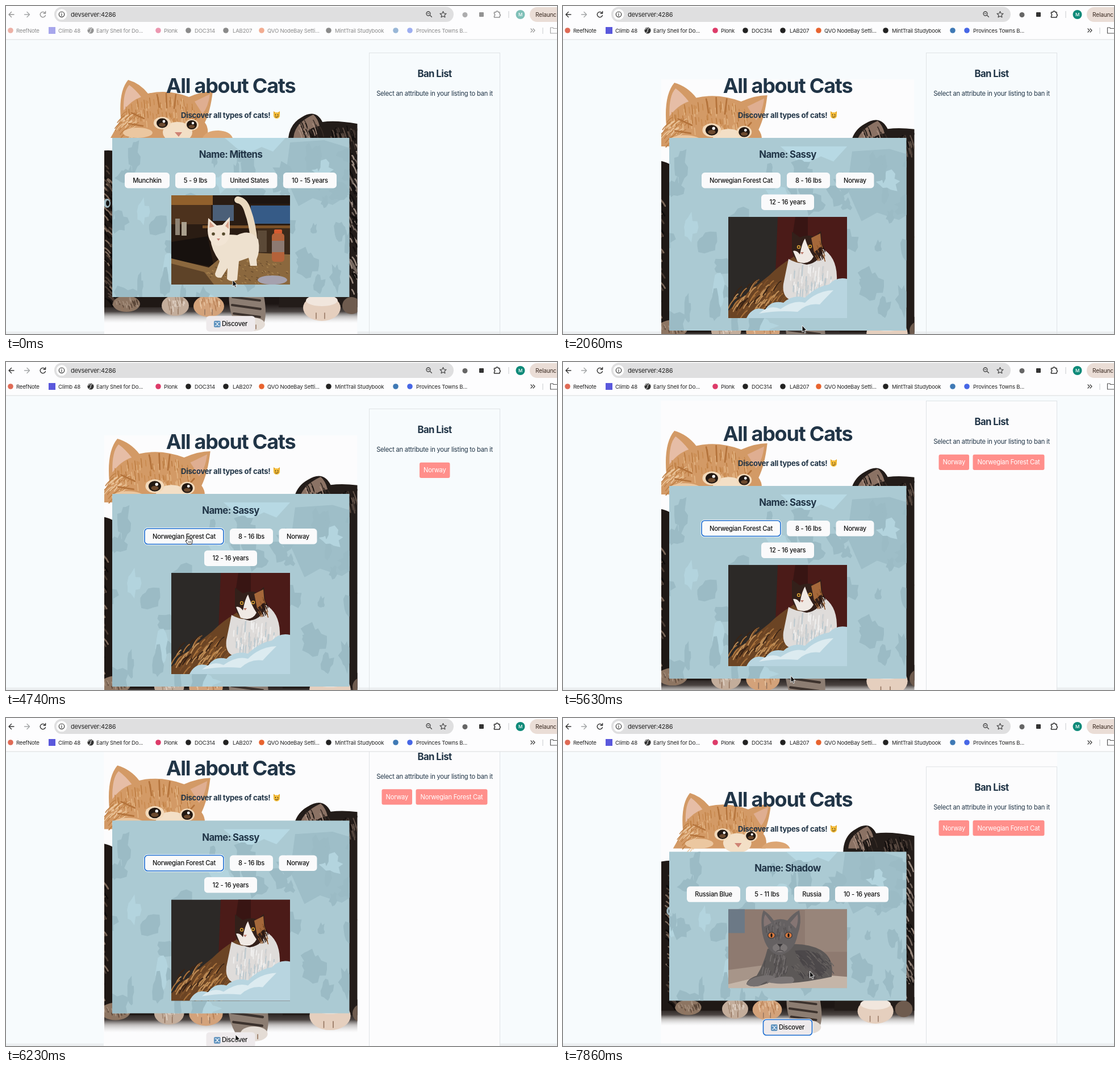
Animation of 970x577 px, one loop 8000 ms. Source, as an HTML page:

```html
<!DOCTYPE html>
<html lang="en">
<head>
<meta charset="utf-8">
<title>All about Cats</title>
<style>
  html, body { margin: 0; width: 100%; height: 100%; overflow: hidden; background: #f7fbfd; }
  svg { display: block; width: 970px; height: 577px; }
  text { font-family: Inter, Roboto, sans-serif; font-optical-sizing: none; letter-spacing: -.022em; white-space: pre; }
  .h1 { letter-spacing: -.035em; }
  .h2 { letter-spacing: -.036em; }
</style>
</head>
<body>
<svg id="stage" viewBox="0 0 970 577"></svg>
<script>
const LOOP = 8000, STEP = 148.15, INK = '#213547';
const stage = document.getElementById('stage');

// Drawing helpers; text is placed by its vertical middle.
const rect = (x, y, w, h, fill, r = 0, more = '') =>
  `<rect x="${x}" y="${y}" width="${w}" height="${h}" rx="${r}" fill="${fill}" ${more}/>`;
const oval = (x, y, rx, ry, fill) => `<ellipse cx="${x}" cy="${y}" rx="${rx}" ry="${ry}" fill="${fill}"/>`;
const dot = (x, y, r, fill) => oval(x, y, r, r, fill);
const shape = (d, fill) => `<path d="${d}" fill="${fill}"/>`;
const line = (d, color, w = 1.4) =>
  `<path d="${d}" fill="none" stroke="${color}" stroke-width="${w}" stroke-linecap="round" stroke-linejoin="round"/>`;
const text = (x, y, str, size, weight = 400, fill = INK, anchor = 'start', cls = '') =>
  `<text x="${x}" y="${y + size * .36}" font-size="${size}" font-weight="${weight}" fill="${fill}" text-anchor="${anchor}" class="${cls}">${str}</text>`;
const move = (x, y, body) => `<g transform="translate(${x} ${y})">${body}</g>`;
const clip = (id, body) => `<g clip-path="url(#${id})">${body}</g>`;

// Piecewise linear value of rows [time, ...values].
function track(rows, t) {
  const i = rows.findIndex(row => row[0] > t);
  if (i < 0) return rows[rows.length - 1].slice(1);
  const a = rows[Math.max(i - 1, 0)], b = rows[i];
  const p = i ? (t - a[0]) / (b[0] - a[0]) : 0;
  return a.slice(1).map((v, k) => v + (b[k + 1] - v) * p);
}

const within = (t, a, b) => t >= a && t < b;

function seeded(seed) {
  return () => (seed = seed * 16807 % 2147483647) / 2147483647;
}

// Short strokes of hair scattered over an oval, lying along (dx, dy).
function fur(seed, count, [cx, cy, rx, ry], [dx, dy], colors, width = 1.5) {
  const rnd = seeded(seed);
  let out = '';
  for (let i = 0; i < count; i++) {
    const a = rnd() * 6.283, r = Math.sqrt(rnd()), k = .5 + rnd();
    const x = cx + Math.cos(a) * r * rx, y = cy + Math.sin(a) * r * ry;
    out += line(`M${x.toFixed(1)},${y.toFixed(1)}q${dx * k * .6},${dy * k * .3} ${dx * k},${dy * k}`, colors[i % colors.length], width);
  }
  return out;
}

// Ragged coat markings seen through the panel.
function markings() {
  const rnd = seeded(77);
  let out = '';
  for (let i = 0; i < 60; i++) {
    const x = 170 + rnd() * 450, y = 262 + rnd() * 260, rx = 6 + rnd() * 20, ry = 10 + rnd() * 26;
    const points = Array.from({ length: 14 }, (_, k) => {
      const r = .45 + rnd() * .6, a = k / 14 * 6.283;
      return (x + Math.cos(a) * rx * r).toFixed(1) + ',' + (y + Math.sin(a) * ry * r).toFixed(1);
    });
    out += `<polygon points="${points.join(' ')}" fill="${i % 6 ? '#9bbbc5' : '#b3d4de'}"/>`;
  }
  return shape('M385,232H492L470,256L450,248L420,262Z', '#b7d9e4') +
    shape('M500,240L560,236L606,250V330L575,350L540,338L515,352L492,300Z', '#9ebec8') + out;
}

const kittens = [
  rect(140, 505, 510, 55, 'url(#floor)'),
  shape('M140,262Q185,246 210,262L330,280V530H140Z', '#1f1815'),
  shape('M497,232Q500,207 520,196Q545,180 557,204Q590,199 650,214V530H480Z', '#231c19'),
  shape('M506,232Q508,206 541,191Q549,198 552,211Q530,214 526,232Z', '#8b7264'),
  fur(5, 26, [535, 213, 22, 14], [5, 13], ['#3a2e28', '#a98f80', '#17120f']),
  fur(6, 50, [595, 224, 28, 16], [3, 10], ['#41352f', '#110d0c', '#5c4c43'], 2),
  fur(7, 80, [180, 395, 12, 130], [8, 9], ['#7d695b', '#0f0b0a', '#4b3c33'], 2.5),
  fur(8, 80, [612, 380, 12, 145], [6, 12], ['#75675f', '#120e0d', '#9b8b80'], 2.5),
  oval(178, 347, 6, 8, '#9fb7bf'), oval(179, 347, 3, 5, '#111'),
  shape('M184,232L193,216L202,198Q198,150 215,130Q236,136 250,154Q285,146 322,160Q345,150 364,150Q360,185 350,205Q358,215 354,232Z', '#d39a66'),
  shape('M346,232Q352,219 374,219Q394,220 399,232Z', '#dca674'),
  shape('M207,184Q206,150 217,139Q228,147 238,160Q220,166 207,184Z', '#e6bda6'),
  shape('M332,168L359,155Q356,178 346,190Z', '#dfae91'),
  fur(9, 90, [272, 182, 62, 24], [1, 10], ['#bd7d42', '#e3b584', '#c98a4f']),
  fur(10, 45, [222, 205, 20, 24], [-9, 8], ['#c08248', '#ecc79d']),
  line('M266,156l4,22M282,154l1,25M299,156l-3,24M221,188l22,10M216,207l25,4M338,194l-8,9', '#b4733b', 2.5),
  oval(302, 222, 26, 18, '#f3dfc6'), oval(232, 223, 26, 9, '#ebc7a0'),
  oval(275, 206, 15, 11, '#f3dabb'), oval(327, 209, 12, 10, '#f3dabb'),
  oval(275, 206, 10, 8.5, '#221812'), oval(327, 209, 9, 8, '#221812'),
  oval(275, 209, 6, 3.5, '#6d4a2e'), oval(327, 212, 5.5, 3, '#6d4a2e'),
  dot(278, 203, 2.4, '#fff'), dot(329, 206, 2.2, '#fff'),
  shape('M297,222h13l-6,8z', '#cf8374'),
  // paws
  oval(212, 524, 24, 14, '#8d7562'), oval(298, 527, 24, 18, '#c3ad9b'),
  oval(357, 528, 27, 19, '#d3a27a'),
  shape('M393,500H452Q462,545 452,563Q425,582 405,560Q390,535 393,500Z', '#8c7d72'),
  oval(434, 560, 22, 12, '#e4dcd5'),
  oval(556, 531, 33, 23, '#e5cfbe'), oval(556, 518, 28, 10, '#f1e6dd'), oval(608, 527, 16, 15, '#6e5b4e'),
  fur(11, 24, [212, 520, 20, 8], [2, 6], ['#5a4638', '#a89280']),
  fur(12, 24, [300, 520, 18, 9], [1, 7], ['#e2d4c8', '#a28873']),
  fur(13, 24, [357, 520, 20, 9], [1, 7], ['#e8c6a4', '#b98257']),
  line('M291,533v9M303,533v9M350,534v9M363,534v9M428,562v7M440,561v7M546,540v10M561,540v10M205,529v7M219,529v7', '#94745f', 1.5),
  line('M399,512l48,6M398,526l50,7M401,541l46,6', '#3c322d', 4)
].join('');
const coat = markings();

const whiteCat = [
  rect(0, 0, 209, 157, '#2a1c13'), rect(0, 0, 73, 17, '#91602c'),
  rect(0, 17, 70, 34, '#4d321d'), rect(73, 17, 37, 28, '#4b5f78'),
  rect(140, 18, 69, 32, '#365b87'), rect(110, 0, 99, 15, '#1e1510'),
  rect(55, 53, 154, 5, '#7a5027'), rect(150, 58, 59, 45, '#3c2a1b'),
  rect(7, 41, 8, 29, '#8e8375'), rect(18, 47, 9, 24, '#aaa08e'), rect(152, 62, 16, 38, '#5b4937'),
  shape('M0,82L64,72L75,126L0,113Z', '#17110e'),
  shape('M0,111L66,127L100,99L209,104V157H0Z', '#8b683e'),
  shape('M0,120L58,135L75,157H0Z', '#5e4328'),
  fur(14, 90, [135, 134, 74, 22], [2, 1], ['#a8834f', '#6d5030']),
  oval(178, 149, 26, 8, '#a5a1ae'),
  line('M146,84Q143,50 135,29Q130,10 117,8', '#ead9c0', 12),
  shape('M69,77Q90,67 116,70Q140,58 153,78Q157,98 150,113L151,124H139L136,110L119,116L116,149Q105,154 98,147L99,128L88,145Q77,146 77,138L85,116Q70,95 69,77Z', '#eee1cf'),
  shape('M64,62L65,40L80,53L90,52L103,38L103,65Q101,87 84,89Q65,87 64,62Z', '#f2e5d5'),
  shape('M67,57l1,-11l8,9zM95,54l6,-9v14z', '#d9a28a'),
  dot(74, 68, 2.8, '#554a2c'), dot(92, 68, 2.8, '#554a2c'), shape('M80,76h6l-3,4z', '#c9877a'),
  rect(181, 60, 14, 8, '#d65a2f', 2), rect(177, 67, 22, 50, '#b4623a', 5), rect(177, 80, 22, 20, '#8d7a72')
].join('');

const longHairCat = [
  rect(0, 0, 209, 178, '#2c2927'), shape('M87,0H209V178H80Z', '#4b1b18'),
  shape('M118,0h22v40h-28z', '#381513'),
  shape('M0,178V165Q40,128 72,103Q90,85 112,72Q150,45 174,62Q196,90 190,135L120,178Z', '#6b4424'),
  fur(15, 130, [68, 142, 58, 34], [-10, 13], ['#3a2416', '#a8713b', '#7c4f29', '#c08e57'], 2),
  shape('M106,74Q143,95 166,56Q190,70 191,104Q194,142 145,147Q92,157 97,118Z', '#dfdcda'),
  fur(16, 90, [146, 110, 38, 28], [-1, 13], ['#f0efee', '#bcc9cf', '#d5d3d2'], 2),
  shape('M112,58L112,26L126,36Q140,30 151,35L163,25L166,56Q163,80 138,84Q115,80 112,58Z', '#33201a'),
  shape('M146,37L162,29L164,52L151,62Z', '#a5683a'),
  shape('M114,60Q120,58 126,66Q130,45 135,38Q141,57 150,70Q142,86 122,79Z', '#f0e9e4'),
  fur(17, 22, [160, 58, 9, 16], [4, 8], ['#8e572c', '#2a1812']),
  dot(124, 53, 3.2, '#d49a35'), dot(144, 52, 3.2, '#d49a35'), dot(124, 53, 1.5, '#111'), dot(144, 52, 1.5, '#111'),
  shape('M127,62h6l-3,4z', '#b97869'),
  shape('M32,178Q43,156 65,163Q76,146 97,151Q113,136 135,142Q155,122 177,119Q190,105 209,109V178Z', '#b8d5e0'),
  shape('M54,170q19,-17 38,-8q24,-17 43,-11q21,-21 50,-22q-18,18 -24,25q-22,-3 -39,13q-35,-3 -68,3z', '#dcebf0')
].join('');

const greyCat = [
  rect(0, 0, 209, 139, '#8e7a70'), rect(0, 0, 29, 42, '#6c7986'), rect(135, 0, 74, 75, '#98857a'),
  shape('M0,116Q50,105 209,119V139H0Z', '#c4b5a8'), shape('M0,107L60,99L55,119L0,132Z', '#a79589'),
  shape('M69,70Q126,52 163,72Q187,86 182,119Q140,128 110,130L72,129Q43,141 32,132Q33,123 50,117Q62,98 69,70Z', '#5c5857'),
  shape('M117,73Q155,68 172,96Q177,112 160,118Q133,112 117,73Z', '#4c484a'),
  fur(18, 80, [145, 96, 34, 24], [6, 6], ['#686361', '#484446', '#5b5656']),
  fur(19, 60, [84, 100, 22, 24], [-2, 9], ['#757070', '#504c4d']),
  shape('M32,132Q36,121 56,118Q78,112 84,123Q62,127 55,135Q40,138 32,132Z', '#757070'),
  shape('M68,128Q82,116 112,119Q120,125 112,130Q85,133 68,128Z', '#7a7575'),
  shape('M60,43Q56,15 62,2Q73,9 80,20Q92,15 104,20Q114,7 125,2Q130,24 122,45Q116,77 89,81Q67,76 60,43Z', '#656162'),
  shape('M63,31Q61,17 65,9L76,24ZM109,24L122,9Q124,22 119,34Z', '#857573'),
  fur(20, 45, [91, 34, 24, 13], [0, 6], ['#736e6e', '#555152']),
  oval(76, 46, 7, 6, '#454143'), oval(106, 46, 7, 6, '#454143'),
  oval(76, 46, 5.5, 4.5, '#d9793d'), oval(106, 46, 5.5, 4.5, '#d9793d'),
  oval(76, 46, 1.6, 3.5, '#171717'), oval(106, 46, 1.6, 3.5, '#171717'),
  oval(91, 68, 13, 8, '#7b7676'),
  shape('M86,61h10l-5,6z', '#393638'), line('M91,67v4M85,74q6,-4 12,0', '#393638', 1)
].join('');

// Chips are [label, x, width, row].
const MITTENS = {
  name: 'Mittens', art: whiteCat, top: 333, tall: 157, dy: 0, back: '',
  chips: [['Munchkin', 209, 79, 0], ['5 - 9 lbs', 298, 71, 0], ['United States', 379.5, 98, 0], ['10 - 15 years', 488, 94, 0]]
};
const SASSY = {
  name: 'Sassy', art: longHairCat, top: 371, tall: 178, dy: 0, back: 'matrix(1.098 0 0 1.098 -40 -7.7)',
  chips: [['Norwegian Forest Cat', 244, 139, 0], ['8 - 16 lbs', 394, 76, 0], ['Norway', 480.5, 67, 0], ['12 - 16 years', 349, 93, 1]]
};
const SHADOW = {
  name: 'Shadow', art: greyCat, top: 333, tall: 139, dy: 3.3, back: 'matrix(.958 0 0 .957 17.5 4.3)',
  chips: [['Russian Blue', 218, 94, 0], ['5 - 11 lbs', 322, 74, 0], ['Russia', 407, 62, 0], ['10 - 16 years', 479, 94, 0]]
};
const bottomOf = cat => cat.top + cat.tall + 22;

function button(x, y, w, label, focused, hovered, fill = '#fafafb', shift = 0) {
  const h = 27.5;
  const halo = focused ? rect(x - .3, y - .3, w + .6, h + .6, fill, 6, 'stroke="#fff" stroke-width="3"') : '';
  const edge = focused ? 'stroke="#1a6cd0" stroke-width="1.6"' : hovered ? 'stroke="#a9a8e8"' : '';
  return halo + rect(x, y, w, h, fill, 5.6, edge) +
    text(x + w / 2 + shift, y + h / 2, label, 11.2, 500, '#111', 'middle');
}

function listing(cat, focus, hover) {
  const bottom = bottomOf(cat), y = bottom + 33.2;
  const placed = body => `<g transform="${cat.back}">${body}</g>`;
  const emoji = shape('M471,192L471,185L475,188H478L482,185V192Z', '#e7a928') + dot(476.5, 192.5, 5.6, '#f4bd3a') +
    dot(474.5, 191.5, .9, '#443016') + dot(478.6, 191.5, .9, '#443016') + line('M474,195q3,2 5.5,-1', '#443016', 1);
  const shuffle = rect(366, y + 8.5, 11.5, 11.5, '#5d91bd', 2) +
    line(`M368,${y + 11.5}h2l4,5.5h2M368,${y + 17}h2l4,-5.5h2`, '#fff', 1.1);
  return clip('photo', placed(kittens)) +
    text(395.5, 140, 'All about Cats', 36, 700, INK, 'middle', 'h1') +
    text(308, 192, 'Discover all types of cats!', 13.1, 700) + emoji +
    rect(187, 232, 417.5, bottom - 232, '#abcad3') + clip('panel' + cat.name, placed(coat)) +
    text(395.5, 261, 'Name: ' + cat.name, 16.8, 700, INK, 'middle', 'h2') +
    cat.chips.map(([label, x, w, row]) =>
      button(x, 293 + row * 38.5, w, label, focus === label, hover === label)).join('') +
    move(291, cat.top, clip('art' + cat.name, cat.art)) +
    button(352.5, y, 86, 'Discover', focus === 'Discover', false, '#eeeaec', 7) + shuffle;
}

function banList(bans) {
  const spots = bans.length > 1 ? [[661.5, 53.5], [721.5, 126]] : [[728, 53.5]];
  return rect(639.5, 82.5, 230, 560, 'none', 0, 'stroke="#dfe3e6"') +
    text(754.5, 119, 'Ban List', 16.8, 700, INK, 'middle', 'h2') +
    text(754.5, 154, 'Select an attribute in your listing to ban it', 11.2, 400, INK, 'middle') +
    bans.map((label, i) => rect(spots[i][0], 176.7, spots[i][1], 27.3, '#ff8f8b', 3) +
      text(spots[i][0] + spots[i][1] / 2, 190.3, label, 11.2, 400, '#fff', 'middle')).join('');
}

// Bookmarks are [icon x, colour, text x, label].
const bookmarks = [
  [8, '#df6a55', 18, 'ReefNote'], [81, '#5a58dc', 92, 'Climb 48'], [149, '#333', 159, 'Early Shell for Do...'],
  [268, '#dd3b69', 278, 'Plonk'], [321, '#222', 332, 'DOC314'], [387, '#222', 399, 'LAB207'],
  [450, '#e8632f', 460, 'QVO NodeBay Setti...'], [568, '#222', 579, 'MintTrail Studybook'],
  [686, '#3f79b5', 0, ''], [711, '#4767e6', 722, 'Provinces Towns B...']
];

function toolbar(active) {
  const dark = '#333';
  const icons =
    line('M14,15H5.5M9.5,10.5L5,15L9.5,19.5', dark) +
    line('M68.5,12A4.7,4.7 0 1 0 69.4,16.5M69.6,9.5V13H66', dark) +
    dot(808, 15.5, 4.5, '#666') + rect(833, 11, 8, 8, '#333', 1) +
    line('M859.5,11H862.5A2,2 0 0 1 866.5,11H869V14.2A2,2 0 0 1 869,18V20H859.5V17.5A2,2 0 0 0 859.5,13.8Z', dark, 1.5) +
    dot(905.5, 15, 8, '#0d8a79') + text(905.5, 15, 'M', 8, 500, '#fff', 'middle') +
    bookmarks.map(([x, fill, tx, label]) =>
      (fill === '#5a58dc' ? rect(x - 6, 37, 12, 12, fill) : dot(x, 43, x === 149 ? 5.6 : 4.8, fill)) +
      text(tx, 43.3, label, 9.6, 400, '#222')).join('') +
    line('M152,39q-4,1 -3,4t-3,4M149,38q-3,3 -5,3', '#fff', 1) +
    line('M924,40l3,3l-3,3M928,40l3,3l-3,3', dark, 1.2) +
    line('M972,39.5H964L962.5,38H958.5V48H972', '#555', 1.2);
  return rect(0, 0, 970, 59, '#fdfdfe') + rect(0, 58.5, 970, 1, '#d9dcde') +
    rect(85, 1.5, 703, 26.5, '#dfdfe0', 13.2) + dot(98, 14.7, 9.5, '#fff') +
    `<circle cx="98" cy="14.7" r="4.7" fill="none" stroke="#333" stroke-width="1.2"/>` +
    line('M98,14.5V17', '#333', 1.2) + dot(98, 12.5, .7, '#333') +
    text(114, 14.8, 'devserver:4286', 11, 400, '#222') +
    line('M32.5,15H41M37,10.5L41.5,15L37,19.5', '#a3a5a7') +
    `<circle cx="743.5" cy="13.5" r="3.5" fill="none" stroke="#444" stroke-width="1.3"/>` +
    line('M746.3,16.3L749.5,19.3M742,13.5h3', '#444', 1.2) +
    line('M769.5,9.5l1.6,3.5l3.9,.4l-2.9,2.6l.8,3.8l-3.4,-1.9l-3.4,1.9l.8,-3.8l-2.9,-2.6l3.9,-.4z', '#444', 1.2) +
    rect(884.5, 9, 1, 12, '#c9cbcd') + rect(944.5, 38, 1, 11, '#c9cbcd') +
    rect(922, 2, 80, 26, '#eaddd6', 13) + text(932, 15, 'Relaunc', 10.2, 400, '#3a2a22') +
    `<g opacity="${active ? 1 : .52}">${icons}</g>`;
}

const arrow = '<path d="M0,0V11.6L2.7,9.2L4.5,13.3L6.4,12.5L4.7,8.5H8Z" fill="#111" stroke="#fff" stroke-width=".9"/>';
const hand = '<path d="M-1.4,1Q0,-1 1.2,1V5.2Q2.6,4.2 3.6,5.6Q5,4.8 6,6.2Q7.8,5.8 8,7.6V10.5Q7.6,12 6.8,14.5H-.2Q-1.5,12 -3.8,9.2Q-4.2,7 -1.4,8.6Z" fill="#fff" stroke="#111"/>' +
  line('M1.4,9.5v2.5M3.4,9.5v2.5M5.4,9.5v2.5', '#111', .7);

const pointerPath = [
  [0, 399, 482], [880, 421, 562], [2360, 421, 562], [2810, 446, 306], [3250, 509, 306], [3560, 509, 306],
  [4000, 430, 314], [4440, 320, 306], [4900, 320, 306], [5330, 401, 552], [5630, 401, 552],
  [6230, 404, 557], [6800, 404, 548], [7560, 404, 548], [7852, 434.5, 445.5]
];
const scrollPath = [[5482, 0], [5630, 14], [6230, 52], [6667, 68], [6815, 72], [7200, 72]];

function focusAt(t) {
  if (within(t, 1320, 2050) || t >= 6800) return 'Discover';
  if (within(t, 3390, 4730)) return 'Norway';
  return within(t, 4730, 6800) ? 'Norwegian Forest Cat' : '';
}

function hoverAt(t) {
  if (within(t, 2780, 3000)) return '8 - 16 lbs';
  if (within(t, 3090, 3650)) return 'Norway';
  return within(t, 4250, 5000) ? 'Norwegian Forest Cat' : '';
}

const clipBox = (id, ...box) => `<clipPath id="${id}">${rect(...box, '#000')}</clipPath>`;
const defs = '<defs>' + clipBox('photo', 173, 60, 445.5, 640) +
  [MITTENS, SASSY, SHADOW].map(cat =>
    clipBox('art' + cat.name, 0, 0, 209, cat.tall) +
    clipBox('panel' + cat.name, 187, 232, 417.5, bottomOf(cat) - 232)).join('') +
  `<linearGradient id="floor" gradientUnits="userSpaceOnUse" x1="0" y1="524" x2="0" y2="558">
    <stop stop-color="#1d1614"/><stop offset=".4" stop-color="#2c2421" stop-opacity=".85"/>
    <stop offset=".65" stop-color="#8d8885" stop-opacity=".5"/><stop offset="1" stop-color="#ccc" stop-opacity="0"/>
  </linearGradient></defs>`;

function render(t) {
  const cat = t < 2050 ? MITTENS : t < 7250 ? SASSY : SHADOW;
  const scroll = cat === SHADOW ? 0 : track(scrollPath, t)[0];
  const dy = cat.dy - scroll;
  const [x, y] = track(pointerPath, t);
  const bans = ['Norway', 'Norwegian Forest Cat'].slice(0, t < 3390 ? 0 : t < 4880 ? 1 : 2);
  const paper = t >= 5620
    ? rect(172, cat === SHADOW ? 59 : 82 - scroll, 698, 600, '#fcfcfd')
    : rect(173, cat === SASSY ? 129 : 545, 445.5, 500, '#fcfcfd');
  const onButton = within(t, 1320, 2050) || within(t, 2780, 5000) || within(t, 6800, 7600);
  const foot = rect(0, 572.5, 970, 5, '#eceff1');
  return defs + rect(0, 0, 970, 577, '#f7fbfd') + foot + paper +
    move(0, dy, listing(cat, focusAt(t), hoverAt(t)) + banList(bans)) +
    (cat === SHADOW ? foot : '') + toolbar(t >= 1170) +
    move(x, y, onButton ? hand : arrow);
}

let shown = -1;
function tick(now) {
  const step = Math.floor((now % LOOP + 15) / STEP);
  if (step !== shown) {
    shown = step;
    stage.innerHTML = render(step * STEP);
  }
  requestAnimationFrame(tick);
}
tick(performance.now());
</script>
</body>
</html>
```
